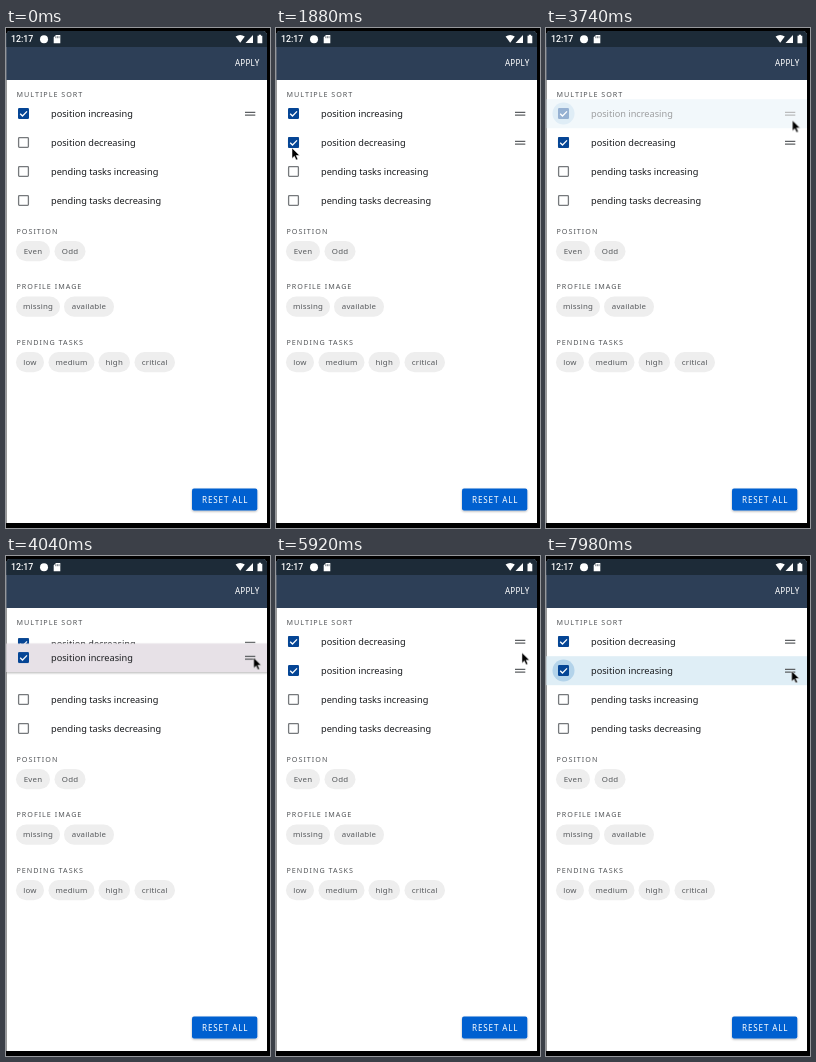
These frames come from a looping animation (264x500 px, 8 s). An HTML page:

```html
<!DOCTYPE html>
<html lang="en">
<head>
<meta charset="utf-8">
<title>Sort and filter</title>
<style>
html, body { margin: 0; width: 100%; height: 100%; overflow: hidden; background: #000; }
svg { display: block; width: 264px; height: 500px; font-family: "Noto Sans", sans-serif; }
.heading { font-size: 7.2px; letter-spacing: 1px; fill: #54575a; }
.option { font-size: 9.2px; fill: #17191c; }
.chip { font-size: 7.9px; letter-spacing: .2px; fill: #56595c; text-anchor: middle; }
.pill { fill: #eee; }
.bar { font-size: 8.1px; font-weight: 500; fill: #fff; }
.clock { font: 500 8.8px Roboto, sans-serif; fill: #fff; }

.anim { animation: 8s linear infinite; }
#cursor { animation-name: cursor; }
#first { animation-name: first; }
#firstBody { animation-name: dim; }
#second { animation-name: second; }
#tint { animation-name: tint; }
#lift { animation-name: lift; }
#ripple { animation-name: ripple; }
#checked { animation-name: check; }

@keyframes cursor {
  0%, 0.2% { transform: translate(264px, 500px); animation-timing-function: ease-in-out; }
  11% { transform: translate(16px, 113px); }
  20.75% { transform: translate(16px, 113px); }
  21.25% { transform: translate(16px, 120px); }
  23.5% { transform: translate(16px, 120px); animation-timing-function: ease-in-out; }
  32%, 33.75% { transform: translate(242.5px, 93px); }
  38%, 45% { transform: translate(242px, 85px); }
  46.75% { transform: translate(246.4px, 92.4px); }
  49% { transform: translate(247px, 99px); }
  51.25% { transform: translate(248px, 103px); }
  52.75%, 67.5% { transform: translate(248.5px, 113.4px); }
  70.6% { transform: translate(247px, 144px); }
  73.75% { transform: translate(246px, 97px); }
  77.5% { transform: translate(245px, 92px); }
  79.25%, 88% { transform: translate(244px, 87px); }
  90%, 92.75% { transform: translate(244px, 107px); }
  94.25%, 100% { transform: translate(245.6px, 115px); }
}
@keyframes first {
  0%, 47% { transform: none; }
  49% { transform: translateY(14px); }
  51.25% { transform: translateY(17px); }
  52.75%, 55.8% { transform: translateY(27.7px); }
  57.5%, 100% { transform: translateY(29px); }
}
@keyframes second {
  0%, 48.75% { transform: translateY(29px); animation-timing-function: ease-out; }
  51%, 100% { transform: none; }
}
@keyframes dim {
  0%, 41% { opacity: 1; }
  43.5%, 46.99% { opacity: .42; }
  47%, 100% { opacity: 1; }
}
@keyframes tint {
  0%, 41% { opacity: 0; }
  42.5%, 46.99% { opacity: 1; }
  47%, 97.25% { opacity: 0; }
  99.25%, 100% { opacity: 1; }
}
@keyframes lift {
  0%, 46.99% { opacity: 0; }
  47%, 59.5% { opacity: 1; }
  62.5%, 100% { opacity: 0; }
}
@keyframes ripple {
  0%, 13.75% { opacity: 0; }
  15%, 16.5% { opacity: 1; }
  18.75%, 100% { opacity: 0; }
}
@keyframes check {
  0%, 14.99% { opacity: 0; }
  15%, 100% { opacity: 1; }
}
</style>
</head>
<body>
<svg viewBox="0 0 264 500">
  <defs>
    <g id="on">
      <rect x="12" y="80" width="11" height="11" rx="1.2" fill="#054595"/>
      <path d="M14.2 85.7l2.3 2.3 4.5-4.6" fill="none" stroke="#fff" stroke-width="1.3"/>
    </g>
    <rect id="off" x="12.6" y="80.6" width="9.8" height="9.8" rx=".8" fill="#fff" stroke="#76797c" stroke-width="1.3"/>
    <path id="grip" d="M239 84.4h10.3M239 87.2h10.3" stroke="#5d6063" stroke-width="1.3"/>
    <filter id="shadow" x="-5%" y="-30%" width="110%" height="170%">
      <feDropShadow dx="0" dy="1" stdDeviation="1" flood-opacity=".3"/>
    </filter>
    <clipPath id="screen"><path d="M.4 495V7q0-4 4-4H256q5 0 5 5V495z"/></clipPath>
  </defs>

  <rect width="264" height="500" fill="#000"/>
  <g clip-path="url(#screen)">
    <rect width="264" height="500" fill="#fff"/>
    <rect width="264" height="52" fill="#2d3f57"/>
    <rect width="264" height="19" fill="#1d2b38"/>

    <g fill="#fff">
      <circle cx="38" cy="11.2" r="4"/>
      <path d="M50 7h4.3v8.3h-6.6V9.3z"/>
      <path d="M229.6 8.6q4.6-3 9.2 0l-4.6 6.2z"/>
      <path d="M247 7v8h-7.5z"/>
      <path d="M251.5 7.8h1.3v-1h2.2v1h1.3v7.4h-4.8z"/>
    </g>
    <path d="M49.8 8.2v2M51.4 8.2v2M53 8.2v2" stroke="#1d2b38" stroke-width=".6"/>
    <text class="clock" x="5" y="14.3">12:17</text>
    <text class="bar" x="229" y="38" letter-spacing=".2">APPLY</text>

    <g class="heading">
      <text x="10.5" y="68.6">MULTIPLE SORT</text>
      <text x="10.5" y="206">POSITION</text>
      <text x="10.5" y="261.3">PROFILE IMAGE</text>
      <text x="10.5" y="316.8">PENDING TASKS</text>
    </g>

    <g class="option">
      <use href="#off" y="58"/>
      <text x="45" y="147">pending tasks increasing</text>
      <use href="#off" y="87"/>
      <text x="45" y="176">pending tasks decreasing</text>
    </g>

    <g id="chips"></g>

    <rect x="186" y="460.6" width="65.3" height="21.8" rx="2" fill="#0560d0" filter="url(#shadow)"/>
    <text class="bar" x="196" y="474.6" letter-spacing=".85">RESET ALL</text>

    <g id="second" class="anim option">
      <circle id="ripple" class="anim" cx="17.5" cy="85.5" r="9" fill="#d5e4f1"/>
      <use href="#off"/>
      <g id="checked" class="anim"><use href="#on"/><use href="#grip"/></g>
      <text x="45" y="89">position decreasing</text>
    </g>

    <g id="first" class="anim option">
      <rect id="lift" class="anim" x="0" y="71.5" width="262" height="28.5" fill="#e7e1e7" filter="url(#shadow)"/>
      <g id="firstBody" class="anim">
        <g id="tint" class="anim">
          <rect x="0" y="71.2" width="262" height="29" fill="#dfeef6"/>
          <circle cx="17.5" cy="85.5" r="11" fill="#b3d3ea"/>
        </g>
        <use href="#on"/>
        <use href="#grip"/>
        <text x="45" y="89">position increasing</text>
      </g>
    </g>
  </g>

  <path id="cursor" class="anim" d="M0 0v10.4l2.4-2.2 1.7 3.8 1.8-.8-1.7-3.7h3.4z" fill="#000" stroke="#fff" stroke-width=".5"/>
</svg>
<script>
// label, left, right, top
const chips = [
  ["Even", 10, 44, 213], ["Odd", 48.5, 79.5, 213],
  ["missing", 10, 54, 268.5], ["available", 58, 108, 268.5],
  ["low", 10, 38, 324], ["medium", 42.5, 88.5, 324],
  ["high", 92.5, 124, 324], ["critical", 128.5, 169, 324]
];
document.getElementById("chips").innerHTML = chips.map(([label, left, right, top]) =>
  `<rect class="pill" x="${left}" y="${top}" width="${right - left}" height="20.3" rx="10.15"/>
   <text class="chip" x="${(left + right) / 2}" y="${top + 12.9}">${label}</text>`).join("");
</script>
</body>
</html>
```
